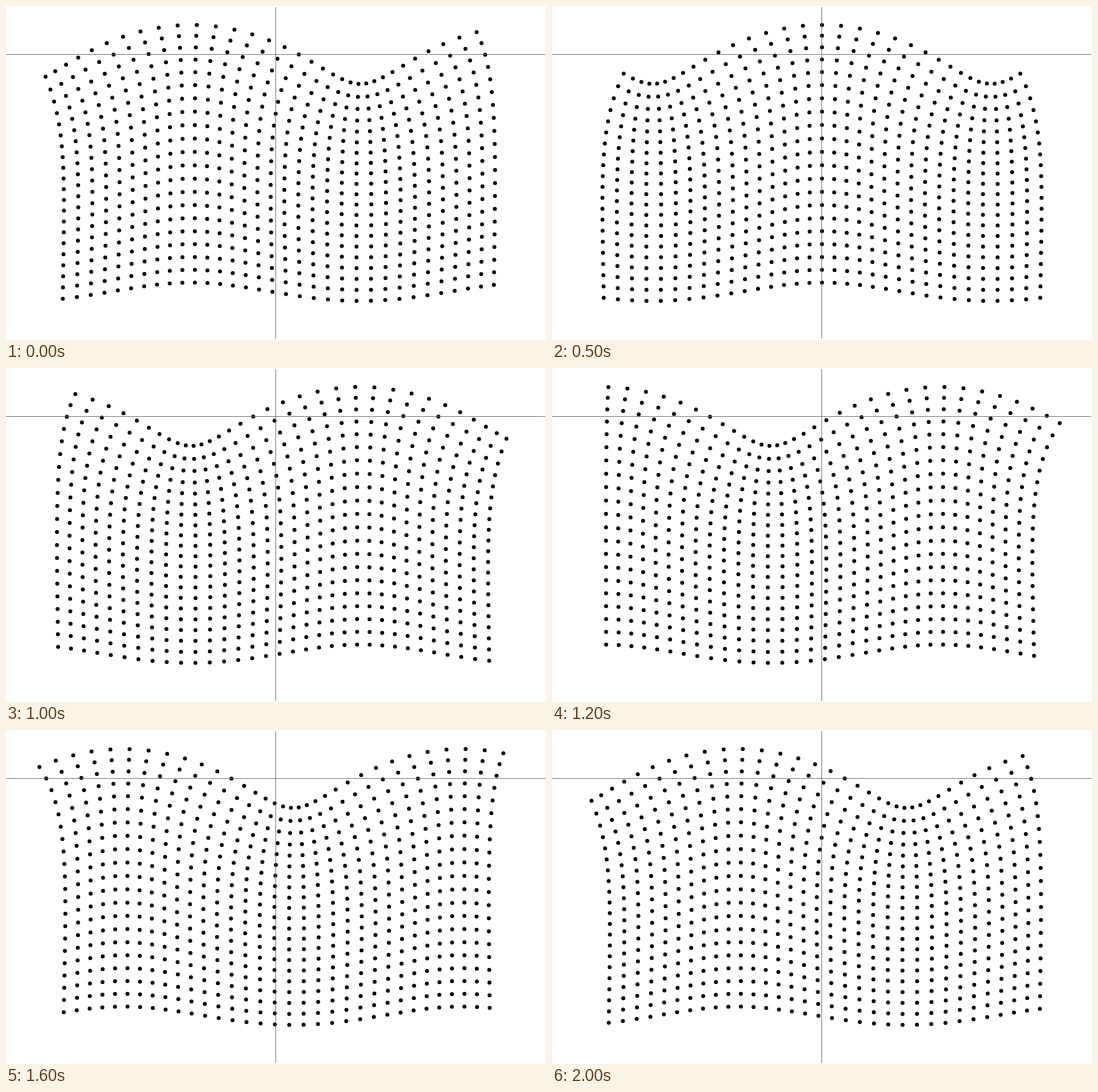
These frames come from a looping animation (950 px wide and 589 px high, 2.1 s). An HTML page:

```html
<!DOCTYPE html>
<html lang="en">
<head>
<meta charset="utf-8">
<title>Surface wave</title>
<style>
  html, body { margin: 0; width: 100%; height: 100%; overflow: hidden; background: #fff; }
  svg { display: block; }
</style>
</head>
<body>
<svg width="950" height="589" viewBox="0 0 950 589">
  <path id="dots" fill="none" stroke="#000" stroke-width="7" stroke-linecap="round"/>
  <path d="M0 85.5H949M474.5 2V587" fill="none" stroke="#666" shape-rendering="crispEdges"/>
</svg>
<script>
  const ORIGIN = { x: 475, y: 85.4 };
  const SCALE = { x: 94.8, y: 83.7 };
  const SPACING = 0.25, COLUMNS = 33, ROWS = 21;
  const STEP_MS = 100, STEPS = 21, STEPS_PER_CYCLE = 20;
  const dots = document.getElementById('dots');

  // Rayleigh wave amplitudes at a given depth
  function amplitudes(depth) {
    const fast = Math.exp(-0.8475 * depth);
    const slow = Math.exp(-0.3933 * depth);
    return { along: fast - 0.5773 * slow, up: 1.4679 * slow - 0.8475 * fast };
  }

  function draw(ms) {
    const step = Math.floor(ms / STEP_MS) % STEPS;
    const phase = 2 * Math.PI * step / STEPS_PER_CYCLE;
    let d = '';
    for (let row = 0; row < ROWS; row++) {
      const depth = row * SPACING;
      const { along, up } = amplitudes(depth);
      for (let col = 0; col < COLUMNS; col++) {
        const x = (col - (COLUMNS - 1) / 2) * SPACING;
        const px = ORIGIN.x + SCALE.x * (x + along * Math.cos(x - phase));
        const py = ORIGIN.y + SCALE.y * (depth + up * Math.sin(x - phase));
        d += `M${px.toFixed(2)} ${py.toFixed(2)}h0`;
      }
    }
    dots.setAttribute('d', d);
  }

  const start = performance.now();
  function tick() {
    draw(performance.now() - start);
    requestAnimationFrame(tick);
  }
  tick();
</script>
</body>
</html>
```
